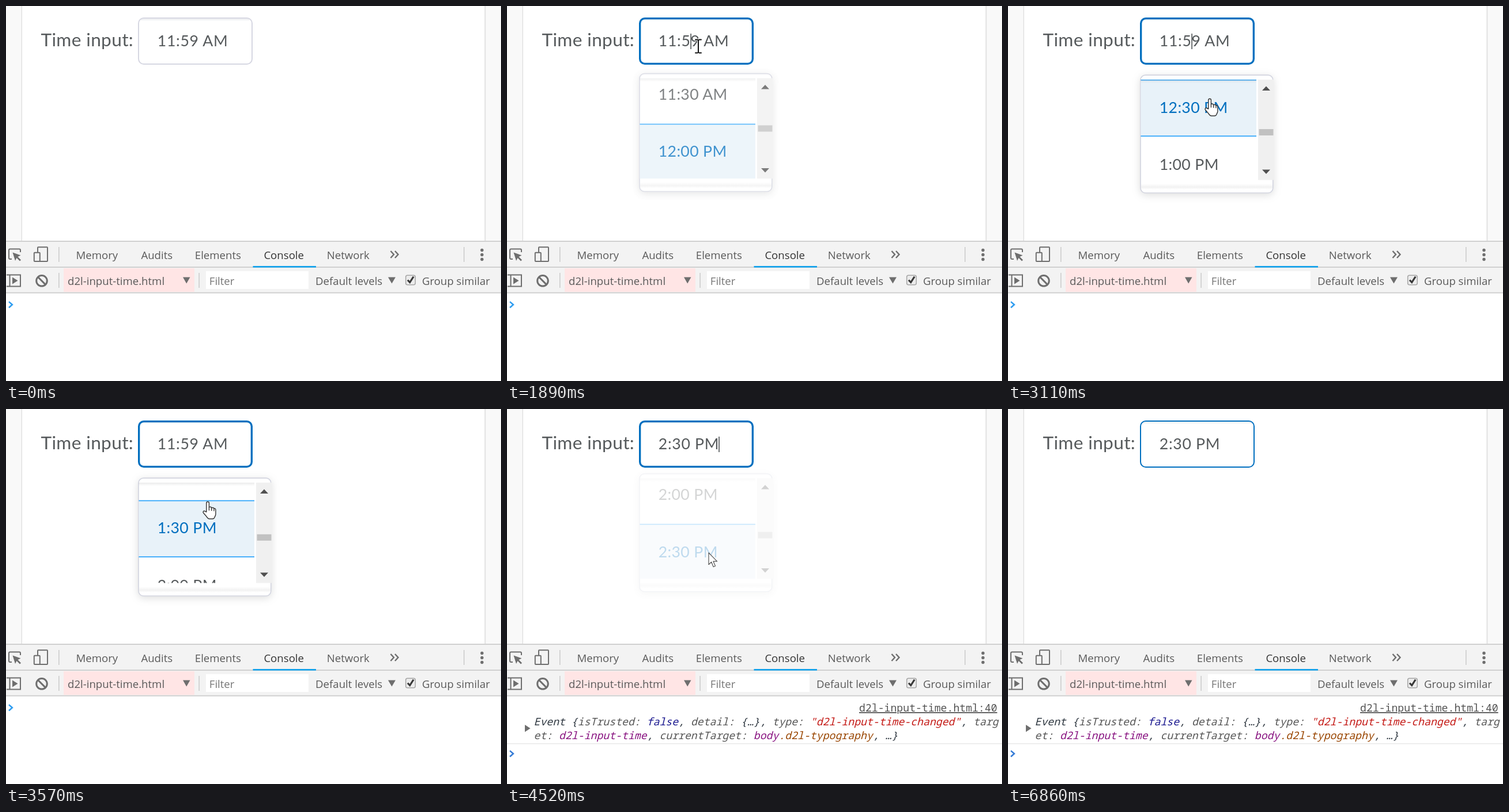
Recreate the animation shown at these times as an HTML page. Size 859 by 652 pixels, loop 6.95 s.

```html
<!DOCTYPE html>
<html lang="en">
<head>
<meta charset="utf-8">
<title>Time input</title>
<style>
  html, body { margin: 0; width: 100%; height: 100%; overflow: hidden; background: #fff; }
  svg { display: block; }
  text { white-space: pre; }
  .page { font-family: Lato, sans-serif; font-size: 26.67px; fill: #565a5c; }
  .label { font-size: 31.67px; letter-spacing: .33px; }
  .value { letter-spacing: .667px; }
  .row text { letter-spacing: .33px; }
  .row rect { fill: none; }
  .row.on text { fill: #006fbf; }
  .row.on .fill { fill: #e8f2f9; }
  .row.on .edge { fill: #29a3fb; }
  .panel { fill: #fff; stroke: #d3d5e0; stroke-width: 1.67; filter: drop-shadow(0 3px 7px rgba(86, 90, 92, .2)); }
  .tools { font-family: "Open Sans", "Noto Sans", sans-serif; font-size: 18.6px; fill: #5a5a5a; }
  .line { fill: none; stroke: #6e6e6e; stroke-width: 2; }
  .solid { fill: #6e6e6e; }
  .rule { fill: #ccc; }
  .log { font-family: "Noto Sans Mono", "DejaVu Sans Mono", monospace; font-size: 18.17px; fill: #303942; }
  .link { fill: #545454; text-decoration: underline; }
  .event { font-style: italic; }
  .key { fill: #565656; }
  .bool { fill: #1c1a90; }
  .str { fill: #c41a16; }
  .tag { fill: #881280; }
  .cls { fill: #994500; }
  .prompt { fill: none; stroke-width: 2.6; }
  .cursor { stroke-linejoin: round; stroke-linecap: round; }
</style>
</head>
<body>
<svg width="859" height="652" viewBox="0 0 859 652">
  <defs>
    <clipPath id="listClip"><rect x="230.4" y="128" width="200.6" height="174.5"/></clipPath>
    <linearGradient id="topShade" x2="0" y2="1">
      <stop stop-color="#565a5c" stop-opacity=".12"/>
      <stop offset="1" stop-color="#565a5c" stop-opacity="0"/>
    </linearGradient>
    <linearGradient id="endShade" x2="0" y2="1">
      <stop stop-color="#f2f2f2" stop-opacity="0"/>
      <stop offset=".6" stop-color="#f2f2f2"/>
      <stop offset="1" stop-color="#f2f2f2" stop-opacity="0"/>
    </linearGradient>
  </defs>

  <g class="page">
    <rect width="859" height="409" fill="#f9f9f9"/>
    <rect x="26" y="-5" width="807" height="420" fill="#f0f0f0"/>
    <rect x="27" y="-5" width="805" height="420" fill="#dfdfdf"/>
    <rect x="28" y="-5" width="802.5" height="420" fill="#fff"/>
    <text class="label" x="60.5" y="69.6">Time input:</text>
    <rect x="231" y="22" width="195" height="78" rx="8" fill="#fff"/>
    <rect x="234" y="22" width="188" height="3" fill="#f1f2f4"/>
    <rect id="box" fill="none"/>
    <text id="value" class="value" x="262.8" y="70"></text>
    <rect id="caret" y="48" width="1.67" height="27" fill="#565a5c"/>

    <g id="menu">
      <rect class="panel" x="230" y="120.2" width="229.8" height="204.8" rx="8.5"/>
      <g clip-path="url(#listClip)">
        <g id="rows"></g>
        <rect x="230" y="128" width="201" height="6" fill="url(#topShade)"/>
      </g>
      <rect x="231" y="309" width="228" height="10" fill="url(#endShade)"/>
      <rect x="434" y="128" width="27" height="174.5" fill="#f0f0f0"/>
      <path d="M441 147L448 139.5L455 147ZM441 284.5L448 292L455 284.5Z" fill="#505050"/>
      <rect id="thumb" x="435.5" width="25" height="11" fill="#c1c1c1"/>
    </g>
  </g>

  <g class="tools">
    <rect y="408" width="859" height="244" fill="#fff"/>
    <rect y="408" width="859" height="91" fill="#f3f3f3"/>
    <path class="rule" d="M0 408.3H859V410H0ZM0 453.3H859V455H0ZM0 497.7H859V499.4H0Z"/>
    <path class="rule" d="M91 419h1.6v26h-1.6zM794 419h1.6v26h-1.6zM91 464h1.6v26h-1.6zM334.3 464h1.6v26h-1.6z"/>

    <path class="line" d="M10 440H7Q5 440 5 438V424.5Q5 422.5 7 422.5H23Q25 422.5 25 424.5V428"/>
    <path class="solid" d="M11.5 428.5L25.5 433.5L20.5 436L26 441.5L24 443.5L18.5 438L16 443Z"/>
    <rect class="line" x="55" y="419.3" width="17" height="24.7" rx="1"/>
    <rect class="line" x="48.8" y="428.8" width="10" height="15.2" rx="1" style="fill:#f3f3f3"/>
    <text x="121.5" y="439.8">Memory</text>
    <text x="234.4" y="439.8">Audits</text>
    <text x="327.8" y="439.8">Elements</text>
    <text x="447.4" y="439.8" fill="#333">Console</text>
    <text x="556.8" y="439.8">Network</text>
    <rect x="428.5" y="452" width="109.5" height="2.7" fill="#12a2ec"/>
    <path class="line" d="M667.5 426L673 432L667.5 438M675 426L680.5 432L675 438" style="stroke-width:2.4"/>
    <g class="solid">
      <circle cx="826" cy="424.5" r="2.7"/><circle cx="826" cy="432.5" r="2.7"/><circle cx="826" cy="440.5" r="2.7"/>
    </g>

    <path class="line" d="M1 467.5H25V487.5H1M6.500 467V488"/>
    <path class="solid" d="M11 471.5L20.5 477.5L11 483.5Z"/>
    <g class="line" style="stroke-width:3"><circle cx="62" cy="477.8" r="9.3"/><path d="M55.500 471.2L68.5 484.4"/></g>
    <rect x="100" y="456" width="227" height="41" fill="#ffe5e5"/>
    <text x="107" y="484.8">d2l-input-time.html</text>
    <path class="solid" d="M307 471.5H319.5L313.2 482.5ZM663 471.5H676L669.5 482.5Z"/>
    <rect x="347" y="461" width="178" height="31" fill="#fff"/>
    <text x="352.8" y="485.2" fill="#777">Filter</text>
    <text x="537" y="484.8">Default levels</text>
    <rect x="693.7" y="468.2" width="16.6" height="16.6" rx="3" fill="#ececec" stroke="#a5a5a5" stroke-width="1.5"/>
    <path d="M697 476.5L700.8 480.5L707.2 470.5" fill="none" stroke="#383838" stroke-width="3.2"/>
    <text x="722" y="484.8">Group similar</text>
  </g>

  <g id="log" class="log">
    <text id="link" class="link" x="611" y="526">d2l-input-time.html:40</text>
    <path class="solid" d="M31 549L40.5 555.3L31 561.6Z"/>
    <text class="event" x="46.5" y="550">Event {<tspan class="key">isTrusted: </tspan><tspan class="bool">false</tspan>, <tspan class="key">detail: </tspan>{…}, <tspan class="key">type: </tspan><tspan class="str">"d2l-input-time-changed"</tspan>, <tspan class="key">targ</tspan></text>
    <text class="event" x="46.5" y="574"><tspan class="key">et: </tspan><tspan class="tag">d2l-input-time</tspan>, <tspan class="key">currentTarget: </tspan><tspan class="tag">body</tspan><tspan class="cls">.d2l-typography</tspan>, …}</text>
    <rect y="581" width="859" height="1.7" fill="#ececec"/>
  </g>
  <path id="prompt" class="prompt" d="M5 -5.2L10.8 0L5 5.2"/>

  <g id="arrow" class="cursor">
    <path d="M0 0V20.5L4.7 16L8.2 24.5L11.5 23L8 14.9H14.6Z" fill="#fff" stroke="#555" stroke-width="1.2"/>
  </g>
  <g id="beam" class="cursor" fill="none">
    <path d="M-5 -11.5H-1.5L0 -10.5L1.5 -11.5H5M0 -10.5V10.5M-5 11.5H-1.5L0 10.5L1.5 11.5H5" stroke="#fff" stroke-width="4"/>
    <path d="M-5 -11.5H-1.5L0 -10.5L1.5 -11.5H5M0 -10.5V10.5M-5 11.5H-1.5L0 10.5L1.5 11.5H5" stroke="#111" stroke-width="2"/>
  </g>
  <g id="hand" class="cursor" stroke="#333" stroke-width="1.4">
    <path fill="#fff" d="M-2.2 18V2.5a2.3 2.3 0 0 1 4.6 0V10c1 -1.4 4 -1 4.4 .9c1 -1 3.7 -.6 4.1 1.2c1.2 -.6 3 0 3 2.4v7c0 3 -1.4 4 -2 6q-1 2.5 -3.5 2.5H3q-2 0 -3.5 -2c-1.8 -2.6 -4.5 -5.5 -7 -8.5c-1.4 -2 .6 -4 2.6 -2.8z"/>
    <path fill="none" d="M2.4 10V15M6.8 11V15.5M10.9 12.2V16"/>
  </g>
</svg>

<script>
const LOOP = 6950, PITCH = 99.3, WHEEL = 165.5;
const $ = id => document.getElementById(id);

// Bursts of movement: first step, last step, number of steps.
const bursts = [
  [220, 870, 9], [950, 1490, 8], [1740, 1960, 4], [2180, 2800, 8],
  [3110, 3340, 4], [3570, 3720, 3], [3890, 4290, 6], [4430, 4600, 3],
  [5060, 5060, 1], [5520, 6070, 8], [6620, 6620, 1], [6860, 6860, 1]
];
const pointer = [
  [220, 706, 634], [540, 515, 395], [870, 343, 194], [1181, 332, 70], [2120, 332, 70],
  [2440, 350, 161], [3810, 350, 161], [3970, 350, 192], [4290, 350, 250],
  [5450, 350, 250], [5834, 620, 519], [6070, 724, 640]
];
const wheels = [[2570, 2800], [3055, 3330], [3530, 3715]];
const blinks = [1740, 2270, 2800, 3340, 3890, 4430, 4510, 5060, 5590, 6070, 6620, 6860];
const FOCUS = 1250, PICK = 4510, BLUR = 6860;

const ramp = (t, a, b) => Math.min(1, Math.max(0, (t - a) / (b - a)));
const inOut = u => u < .5 ? 2 * u * u : 1 - 2 * (1 - u) ** 2;
const set = (el, attrs) => { for (const k in attrs) el.setAttribute(k, attrs[k]); };
const show = (el, on) => { el.style.display = on ? "" : "none"; };

function hold(t) {
  let held = 0;
  for (const [a, b, n] of bursts) {
    if (t < a) break;
    held = n > 1 ? a + Math.floor(ramp(t, a, b) * (n - 1)) * (b - a) / (n - 1) : a;
  }
  return held;
}

function along(path, t) {
  const i = Math.max(1, path.findIndex(p => p[0] >= t));
  const [a, x, y] = path[i - 1], [b, x2, y2] = path[i];
  const u = ramp(t, a, b);
  return [x + (x2 - x) * u, y + (y2 - y) * u];
}

function clock(slot) {
  const h = Math.floor(slot / 2);
  return `${h % 12 || 12}:${slot % 2 ? "30" : "00"} ${h < 12 ? "AM" : "PM"}`;
}

const rows = [];
for (let slot = 22; slot < 32; slot++) {
  const g = document.createElementNS("http://www.w3.org/2000/svg", "g");
  const top = 207.2 + (slot - 24) * PITCH;
  const bar = (cls, y, h) => `<rect class="${cls}" x="230" y="${y}" width="202" height="${h}"/>`;
  g.innerHTML = bar("fill", top, PITCH) + bar("edge", top, 1.67) + bar("edge", top + PITCH - 1.67, 1.67) +
    `<text x="262.8" y="${top + 57.8}">${clock(slot)}</text>`;
  $("rows").append(g);
  rows.push({ g, slot, top });
}

function drawBox(t) {
  const focused = t >= FOCUS && t < BLUR;
  const w = focused ? 3.33 : 2;
  const u = 1 - (1 - ramp(t, 1220, 1440)) ** 2;
  const rgb = [[214, 0], [215, 111], [226, 191]].map(([a, b]) => Math.round(a + (b - a) * u));
  set($("box"), {
    x: 229 + w / 2, y: 20 + w / 2, width: 199 - w, height: 82 - w,
    rx: 10 - w / 2, stroke: `rgb(${rgb})`, "stroke-width": w
  });
  $("value").textContent = t < PICK ? "11:59 AM" : "2:30 PM";
  set($("caret"), { x: t < PICK ? 318.3 : 367.2 });
  show($("caret"), blinks.filter(b => b <= t).length % 2);
}

function drawMenu(t, y) {
  const alpha = ramp(t, 1670, 1960) * (1 - ramp(t, 4380, 4560));
  show($("menu"), alpha > 0);
  set($("menu"), { opacity: alpha, transform: `translate(0 ${-10 * (1 - alpha)})` });
  const scroll = wheels.reduce((s, [a, b]) => s + WHEEL * inOut(ramp(t, a, b)), 0);
  set($("rows"), { transform: `translate(0 ${-scroll})` });
  set($("thumb"), { y: 210 + scroll * .0226 });
  for (const { g, slot, top } of rows) {
    const from = top - scroll;
    const hover = y > 128 && y >= from && y < from + PITCH;
    g.setAttribute("class", hover || slot === 24 ? "row on" : "row");
  }
}

function drawLog(t, x, y) {
  const logged = t >= PICK;
  show($("log"), logged);
  const over = t < 6070 && x > 611 && x < 851 && y > 508 && y < 532;
  $("link").style.fill = over ? "#1c1c1c" : "";
  set($("prompt"), { transform: `translate(0 ${logged ? 599.3 : 519.3})`, stroke: logged ? "#367cd6" : "#2f9df0" });
}

function drawPointer(t, x, y) {
  const inBox = x > 229 && x < 428 && y > 20 && y < 102;
  const inMenu = t >= 1740 && t < PICK && y > 120;
  const kind = inBox ? "beam" : inMenu ? "hand" : "arrow";
  for (const id of ["arrow", "beam", "hand"]) {
    show($(id), id === kind && t >= 220 && t < 6070);
    set($(id), { transform: `translate(${x} ${y})` });
  }
}

const start = performance.now();
function frame() {
  const t = hold((performance.now() - start) % LOOP);
  const [x, y] = t < 6070 ? along(pointer, t) : [0, 0];
  drawBox(t);
  drawMenu(t, y);
  drawLog(t, x, y);
  drawPointer(t, x, y);
  requestAnimationFrame(frame);
}
frame();
</script>
</body>
</html>
```
